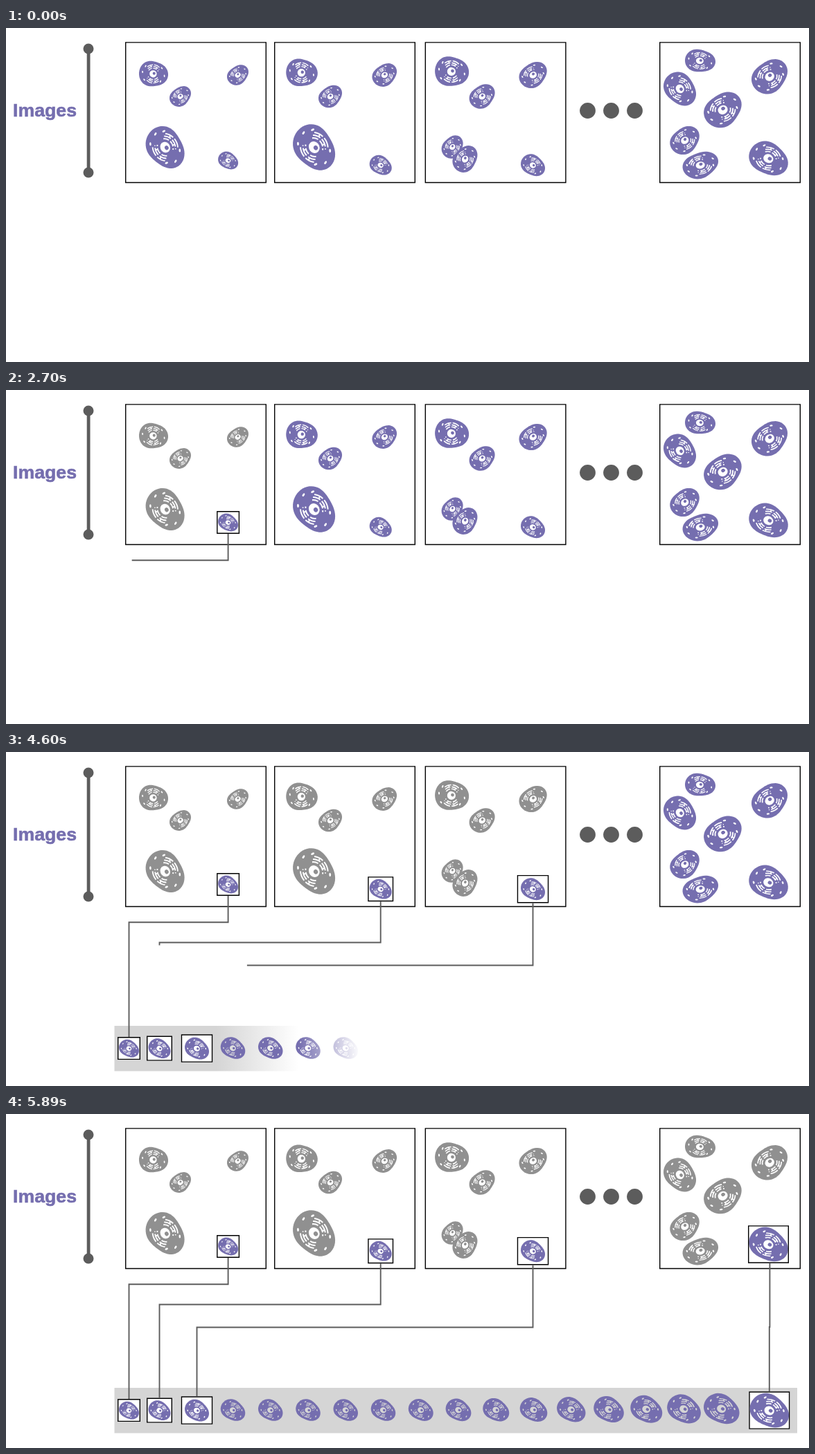
An HTML page with a canvas that plays this animation: 1159 by 483 pixels, repeating every 6080 ms.

```html
<!DOCTYPE html>
<html lang="en">
<head>
<meta charset="utf-8">
<title>Cells sorted by size</title>
<style>
  html, body { margin: 0; width: 100%; height: 100%; overflow: hidden; background: #fff; }
  canvas { display: block; }
</style>
</head>
<body>
<canvas id="stage" width="1159" height="483"></canvas>
<script>
const W = 1159, H = 483, LOOP = 6080, TAU = 2 * Math.PI;
const PURPLE = [117, 110, 175], GREY = [144, 144, 144];
const DARK = '#5c5c5c', STRIP = '213,213,213';
const ROW_Y = 428.6, PANEL_Y = 20, PANEL = 204;
const ctx = document.getElementById('stage').getContext('2d');
const layer = Object.assign(document.createElement('canvas'), { width: W, height: H });
const row = layer.getContext('2d');

// tip: direction of the pointed end, in degrees
const make = (x, y, w, ratio, tip) => ({ x, y, w, h: w * ratio, tip });

// The first three panels share one layout whose cells grow from panel to panel
function family(x, i) {
  const cells = [
    make(x + 41 - i, 66 - 1.75 * i, 42 + 3.5 * i, .87, 5),
    make(x + 162.5 - 3.25 * i, 68, 31 + 4.6 * i, .95, -48),
    make(x + 79.5 + 1.5 * i, 99, 31 + 3 * i, .96, -48)
  ];
  if (i < 2) cells.push(make(x + 57.6, 172.4, 56 + 5 * i, 1.09, 47));
  else cells.push(make(x + 39.5, 172, 31, 1.08, -52), make(x + 57.8, 189.5, 36, 1.08, -52));
  return cells;
}

const crowd = x => [
  make(x + 59, 47, 44, .74, 8), make(x + 29.5, 88, 47, 1.04, 50),
  make(x + 159, 70.3, 52, .97, -48), make(x + 91.4, 118.4, 54.5, .95, -48),
  make(x + 36.5, 162.5, 42.5, .97, -52), make(x + 59.3, 198.6, 51.5, .77, -38)
];

// Picked cell of each panel, its frame, and its way down to the strip
const PANELS = [
  { x: 172, pick: make(320.6, 191.5, 29, .89, 36), fw: 33, fh: 33, bend: 246.2, slot: 177.5 },
  { x: 387, pick: make(540.7, 198.2, 32, .9, 36), fw: 37, fh: 36, bend: 275.5, slot: 221.5 },
  { x: 604.6, pick: make(760.5, 198.2, 35, .91, 36), fw: 45.5, fh: 40.5, bend: 308.5, slot: 275.5 },
  { x: 943, pick: make(1100.5, 188.4, 56.5, .88, 36), fw: 59, fh: 54.5, bend: 308, slot: 1101.8, from: 1102.4 }
].map((p, i) => {
  const { pick, fw, fh, slot, bend, from = pick.x } = p;
  return {
    ...p,
    cells: i < 3 ? family(p.x, i) : crowd(p.x),
    low: { ...pick, x: slot, y: ROW_Y },
    path: [[from, pick.y + fh / 2], [from, bend], [slot, bend], [slot, ROW_Y - fh / 2]]
  };
});

// Unframed cells on the strip, growing to the right
const ROW = Array.from({ length: 14 }, (_, i) => {
  const g = Math.max(0, (i - 4) / 9) ** 1.7;
  return make(327.5 + 54.25 * i, 428 - 2 * g, 35.5 + 16 * g, .89 - .03 * g, 36);
});

const prog = (t, from, to) => Math.min(1, Math.max(0, (t - from) / (to - from)));
const mix = k => `rgb(${PURPLE.map((v, i) => Math.round(v + (GREY[i] - v) * k))})`;

// Rounded pick shape, pointing along x
const radius = a => 1 + .13 * Math.cos(2 * a) + .035 * Math.cos(3 * a);
const OUTLINE = Array.from({ length: 60 }, (_, i) => {
  const a = i / 60 * TAU;
  return [radius(a) * Math.cos(a), radius(a) * Math.sin(a)];
});

function oval(c, x, y, rx, ry, turn = 0) {
  c.beginPath();
  c.ellipse(x, y, rx, ry, turn, 0, TAU);
  c.fill();
}

// Folds on both flanks, specks at both ends, nucleus in the middle
function organelles(c) {
  c.lineWidth = .065;
  for (const side of [TAU / 4, -TAU / 4]) {
    for (let k = 0; k < 3; k++) {
      const r = .4 + .12 * k, half = 1 - .12 * k;
      c.setLineDash([.3 + .08 * k, .09]);
      c.beginPath();
      c.ellipse(0, 0, r * 1.1, r, 0, side - half, side + half);
      c.stroke();
      if (k === 2) continue;
      const a = side + .45 - .8 * k;
      c.setLineDash([]);
      c.beginPath();
      c.moveTo(r * 1.1 * Math.cos(a), r * Math.sin(a));
      c.lineTo((r + .12) * 1.1 * Math.cos(a), (r + .12) * Math.sin(a));
      c.stroke();
    }
  }
  for (const end of [0, TAU / 2])
    for (const da of [-.62, .08, .66]) {
      const a = end + da, r = radius(a) * .76;
      oval(c, r * Math.cos(a), r * Math.sin(a), .085, .048, a + 1.3);
    }
  oval(c, 0, 0, .28, .25);
}

// Fits a turned cell to its width and height; without paper colour the details are cut out
function cell(c, { x, y, w, h, tip }, fill, paper) {
  const a = tip * TAU / 360, cs = Math.cos(a), sn = Math.sin(a);
  const xs = OUTLINE.map(([u, v]) => u * cs - v * sn), ys = OUTLINE.map(([u, v]) => u * sn + v * cs);
  const x0 = Math.min(...xs), x1 = Math.max(...xs), y0 = Math.min(...ys), y1 = Math.max(...ys);
  c.save();
  c.translate(x, y);
  c.scale(w / (x1 - x0), h / (y1 - y0));
  c.translate(-(x0 + x1) / 2, -(y0 + y1) / 2);
  c.rotate(a);
  c.fillStyle = fill;
  c.beginPath();
  for (const p of OUTLINE) c.lineTo(...p);
  c.fill();
  c.fillStyle = c.strokeStyle = paper || '#000';
  if (!paper) c.globalCompositeOperation = 'destination-out';
  organelles(c);
  c.globalCompositeOperation = 'source-over';
  c.fillStyle = fill;
  oval(c, .07, -.04, .11, .1);
  c.restore();
}

// Draws the first part p of a polyline
function trace(pts, p, color, width) {
  if (p <= 0) return;
  const len = i => Math.hypot(pts[i][0] - pts[i - 1][0], pts[i][1] - pts[i - 1][1]);
  let left = 0;
  for (let i = 1; i < pts.length; i++) left += len(i);
  left *= p;
  ctx.beginPath();
  ctx.moveTo(...pts[0]);
  for (let i = 1; i < pts.length && left > 0; i++) {
    const k = Math.min(1, left / len(i)), [x, y] = pts[i - 1];
    ctx.lineTo(x + (pts[i][0] - x) * k, y + (pts[i][1] - y) * k);
    left -= len(i);
  }
  ctx.strokeStyle = color;
  ctx.lineWidth = width;
  ctx.stroke();
}

function frame(x, y, w, h, p = 1) {
  const l = x - w / 2 + .7, r = x + w / 2 - .7, t = y - h / 2 + .7, b = y + h / 2 - .7;
  trace([[l, t], [r, t], [r, b], [l, b], [l, t - .7]], p, '#000', 1.4);
}

function faded(alpha, paint) {
  if (alpha <= 0) return;
  ctx.globalAlpha = alpha;
  paint();
  ctx.globalAlpha = 1;
}

// Left-to-right wipe with a soft edge
function wipe(c, x, w, p, rgb) {
  const soft = w * .12, edge = x + p * (w + soft);
  const g = c.createLinearGradient(edge - soft, 0, edge, 0);
  g.addColorStop(0, `rgba(${rgb},1)`);
  g.addColorStop(1, `rgba(${rgb},0)`);
  return g;
}

function still() {
  ctx.fillStyle = '#fff';
  ctx.fillRect(0, 0, W, H);
  ctx.fillStyle = ctx.strokeStyle = mix(0);
  ctx.font = 'bold 26.7px "Liberation Sans", Arial, sans-serif';
  ctx.lineWidth = .6;
  ctx.fillText('Images', 10, 128);
  ctx.strokeText('Images', 10, 128);
  ctx.fillStyle = DARK;
  ctx.fillRect(116.7, 30, 4.8, 179);
  for (const y of [30, 209]) oval(ctx, 119, y, 7.5, 7.5);
  for (let i = 0; i < 3; i++) oval(ctx, 839.5 + 34 * i, 119.5, 11.4, 11.4);
  for (const { x } of PANELS) frame(x + PANEL / 2, PANEL_Y + PANEL / 2 + .2, PANEL, PANEL);
}

function strip(p) {
  if (p <= 0) return;
  ctx.fillStyle = wipe(ctx, 156.5, 985.5, p, STRIP);
  ctx.fillRect(156.5, 396, 985.5, 65.5);
  row.clearRect(0, 0, W, H);
  for (const c of ROW) cell(row, c, mix(0));
  row.globalCompositeOperation = 'destination-in';
  row.fillStyle = wipe(row, 310, 748, p, '0,0,0');
  row.fillRect(0, 0, W, H);
  row.globalCompositeOperation = 'source-over';
  ctx.drawImage(layer, 0, 0);
}

function draw(t) {
  const show = prog(t, 3620, 4100), last = prog(t, 5380, 5740), mid = prog(t, 3886, 4846);
  const grey = [prog(t, 620, 1100), show, show, last];
  const reach = [prog(t, 2150, 3230), mid, mid, prog(t, 5393, 5720)];
  const boxed = [show, show, show, last], landed = [prog(t, 3130, 3500), show, show, last];

  still();
  PANELS.forEach(({ cells, pick }, i) => {
    for (const c of cells) cell(ctx, c, mix(grey[i]), '#fff');
    cell(ctx, pick, mix(0), '#fff');
  });
  strip(prog(t, 4370, 5330));

  PANELS.forEach(({ pick, low, fw, fh, path }, i) => {
    if (i) faded(boxed[i], () => frame(pick.x, pick.y, fw, fh));
    else frame(pick.x, pick.y, fw, fh, prog(t, 1210, 2000));
    faded(boxed[i], () => {
      ctx.fillStyle = '#fff';
      ctx.fillRect(low.x - fw / 2, low.y - fh / 2, fw, fh);
      frame(low.x, low.y, fw, fh);
    });
    faded(landed[i], () => cell(ctx, low, mix(0), '#fff'));
    trace(path, reach[i], DARK, 1.9);
  });
}

function tick() {
  draw(performance.now() % LOOP);
  requestAnimationFrame(tick);
}
tick();
</script>
</body>
</html>
```
